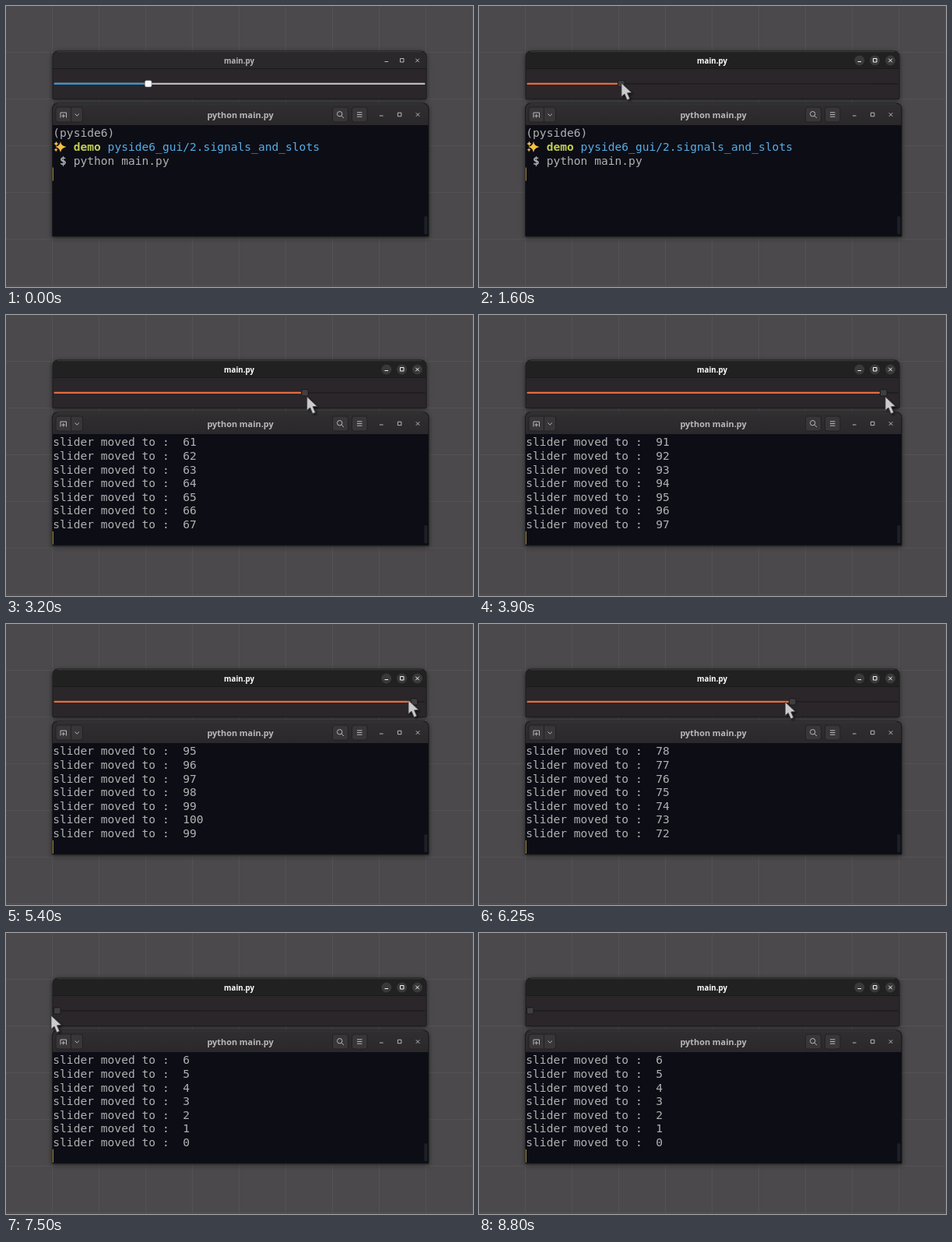
Recreate the animation shown at these times as an HTML page. Size 600 by 361 pixels, loop 9.15 s.

```html
<!DOCTYPE html>
<html lang="en">
<head>
<meta charset="utf-8">
<title>Slider demo</title>
<style>
html, body { margin: 0; width: 100%; height: 100%; overflow: hidden; background: #4b494b; }
svg { display: block; width: 600px; height: 361px; }
.title { font-family: "Open Sans", "Noto Sans", sans-serif; font-weight: 700; text-anchor: middle; }
.term { font: 14.6px "DejaVu Sans Mono", monospace; fill: #b0b1b1; white-space: pre; }
.icon { fill: none; stroke: #b9b8b9; stroke-width: 1; }
</style>
</head>
<body>
<svg viewBox="0 0 600 361">
  <defs>
    <pattern id="grid" width="60" height="60" patternUnits="userSpaceOnUse">
      <path d="M0 59.5H60M59.5 0V60" stroke="#545254" fill="none"/>
    </pattern>
    <filter id="shadow" x="-10%" y="-30%" width="120%" height="170%">
      <feDropShadow dx="0" dy="1.5" stdDeviation="3" flood-opacity=".5"/>
    </filter>
    <filter id="soft" x="-50%" y="-50%" width="220%" height="220%">
      <feDropShadow dx="2" dy="2" stdDeviation="1.5" flood-opacity=".55"/>
    </filter>
    <linearGradient id="head" x2="0" y2="1">
      <stop stop-color="#302e30"/><stop offset="1" stop-color="#2a282a"/>
    </linearGradient>
  </defs>
  <rect width="600" height="361" fill="#4b494b"/>
  <rect width="600" height="361" fill="url(#grid)"/>

  <!-- slider window -->
  <path d="M60 119.5V65q0-7 7-7H533q7 0 7 7V119.5Z" fill="#2a282a" stroke="#1b1a1b" filter="url(#shadow)"/>
  <path id="bar" d="M60.5 80V65q0-6.5 6.5-6.5H533q6.500 0 6.500 6.500V80Z"/>
  <path d="M66 58.700H534" stroke="#3c3a3c"/>
  <path d="M60 80.500H540" stroke="#1b1a1b"/>
  <text id="name" class="title" x="299.500" y="73.700" font-size="9.700">main.py</text>
  <g id="discs" fill="#3a393a">
    <circle cx="488.800" cy="70" r="6.500"/><circle cx="508.600" cy="70" r="6.500"/><circle cx="528.500" cy="70" r="6.500"/>
  </g>
  <path id="controls" class="icon" d="M486.500 71.500h4.600M506.500 67.500h4.500v4.500h-4.500zM526.300 67.700l4.500 4.500m0-4.500l-4.500 4.500"/>
  <rect id="groove" x="62" width="476.500" rx="1"/>
  <rect id="fill" x="61.500" y="98.800" height="2.300" rx="1"/>
  <rect id="knob" y="95.700" width="8.600" height="8.300" rx="1.700"/>

  <!-- terminal window -->
  <path d="M59.500 296V132q0-7 7-7H536q7 0 7 7V296Z" fill="#080b12" stroke="#1b1a1b" filter="url(#shadow)"/>
  <path d="M60 153V132q0-6.500 6.500-6.500H536q6.500 0 6.500 6.500V153Z" fill="url(#head)"/>
  <path d="M66 125.700H536" stroke="#3c3a3c"/>
  <g fill="#383638" stroke="#222122">
    <rect x="64" y="130" width="34.500" height="19" rx="3"/>
    <rect x="419.500" y="130" width="20" height="19" rx="3"/>
    <rect x="444.500" y="130" width="19.500" height="19" rx="3"/>
    <path d="M83.500 130v19"/>
  </g>
  <path class="icon" d="M70 143.500v-6.500h7.500v6.500M73.700 139v4.500M71.500 141.200h4.500M88.500 138.500l2.700 2.700l2.700-2.700M431.300 141.300l2.700 2.700M451 136.800h6.500M451 139.500h6.500M451 142.200h6.500M480 141h4.600M503.400 137.200h4.500v4.500h-4.500zM526.800 137.300l4.500 4.500m0-4.500l-4.500 4.500"/>
  <circle class="icon" cx="428.700" cy="138.700" r="3.200"/>
  <text class="title" x="301" y="143.500" font-size="10.900" fill="#b9b8b9">python main.py</text>
  <g id="prompt">
    <path fill="#f5c044" d="M70 174q.8 5.700 7.500 7q-6.700 1.300-7.500 7q-.8-5.700-6.500-7q5.700-1.300 6.500-7ZM64.500 173.800q.4 2.800 3.200 3.200q-2.800.4-3.200 3.200q-.4-2.800-3.200-3.200q2.800-.4 3.200-3.200ZM64.200 182.200q.3 2.200 2.600 2.600q-2.300.4-2.600 2.600q-.3-2.200-2.600-2.600q2.300-.4 2.600-2.600Z"/>
  </g>
  <g id="rows"></g>
  <rect id="caret" x="59.800" width="1.200" height="17" fill="#92803a"/>
  <rect x="537.300" y="270" width="4" height="23.500" rx="2" fill="#1d2127"/>

  <path id="mouse" d="M0 0V17.500L4 14L7.300 21.700L10.800 20.200L7.500 12.800L13 12.300Z" fill="#cbcbcb" stroke="#3a393a" stroke-width=".8" filter="url(#soft)"/>
</svg>
<script>
const LOOP = 9150, STEP = 50, ACTIVE_AT = 1150, ROW = 17.6, ROWS = 8;
const $ = id => document.getElementById(id);
const set = (id, attrs) => { for (const k in attrs) $(id).setAttribute(k, attrs[k]); };

// time, slider ticks travelled, pointer x, pointer y
const track = [
  [50, 0, 32, 190], [500, 0, 110, 70], [950, 0, 165, 88], [1200, 0, 183, 99],
  [1600, 0, 183, 99], [1900, 4.8, 202, 101], [2450, 12.3, 239, 104],
  [2850, 28, 313, 105], [3800, 70.6, 513, 105], [3900, 72.8, 522, 105],
  [4200, 75.9, 532, 104], [5200, 75.9, 530, 100], [5400, 77.3, 517, 98],
  [5700, 87.8, 468, 99], [6650, 115.5, 339, 101], [6850, 130.3, 271, 102],
  [7500, 175.9, 58, 106], [7600, 175.9, 55, 107], [7900, 175.9, 33, 112],
  [8050, 175.9, 33, 112], [8400, 175.9, -20, 110]
];

function sample(t) {
  const i = track.findIndex(k => k[0] > t);
  if (i === 0) return track[0];
  if (i < 0) return track[track.length - 1];
  const a = track[i - 1], b = track[i], f = (t - a[0]) / (b[0] - a[0]);
  return a.map((v, j) => v + (b[j] - v) * f);
}

// 25 up to 100, then down to 0
const valueAt = n => n <= 75 ? 25 + n : 175 - n;

const esc = "<tspan fill='#c3cf4f' font-weight='700'>demo</tspan> <tspan fill='#57aee6'>pyside6_gui/2.signals_and_slots</tspan>";
const intro = ["(pyside6)", "   " + esc, " <tspan font-weight='700'>$</tspan> python main.py"];

const rows = Array.from({ length: ROWS - 1 }, (_, i) => {
  const row = document.createElementNS("http://www.w3.org/2000/svg", "text");
  row.setAttribute("class", "term");
  row.setAttribute("x", 60.3);
  row.setAttribute("y", 168.3 + ROW * i);
  row.setAttribute("xml:space", "preserve");
  return $("rows").appendChild(row);
});

function drawTerminal(printed) {
  const total = intro.length + printed;
  const first = Math.max(0, total + 1 - ROWS);
  rows.forEach((row, i) => {
    const n = first + i;
    const line = n >= total ? "" : n < intro.length ? intro[n]
      : "slider moved to :  " + valueAt(n - intro.length + 1);
    if (row.line !== line) row.innerHTML = row.line = line;
  });
  set("prompt", { visibility: first < 2 ? "visible" : "hidden", transform: `translate(0 ${-first * ROW})` });
  set("caret", { y: 207.5 + ROW * (total - first - 3) });
}

function drawSlider(value, active) {
  const x = 65.8 + value * 4.68;
  set("bar", { fill: active ? "#222122" : "#2a282a" });
  set("name", { fill: active ? "#ffffff" : "#b9b8b9" });
  set("discs", { visibility: active ? "visible" : "hidden" });
  set("controls", { style: active ? "stroke:#f4f4f4" : "" });
  set("groove", active ? { y: 99.3, height: 1.3, fill: "#1b1a1b" } : { y: 98.8, height: 2.3, fill: "#bdbbb9" });
  set("fill", { width: Math.max(0, x - 66), fill: active ? "#e66b3c" : "#3a93d0" });
  set("knob", { x: x - 4.3, fill: active ? "#403f40" : "#f8f8f8", stroke: active ? "#191819" : "#777677", "stroke-width": active ? 1 : .5 });
}

function draw(now) {
  const t = Math.floor(now % LOOP / STEP) * STEP;
  const [, ticks, x, y] = sample(t);
  drawSlider(valueAt(Math.floor(ticks)), t >= ACTIVE_AT);
  drawTerminal(Math.max(0, Math.floor(ticks - .7)));
  set("mouse", { transform: `translate(${x} ${y})`, visibility: t >= 50 && t < 8400 ? "visible" : "hidden" });
}

const start = performance.now();
function tick() {
  draw(performance.now() - start);
  requestAnimationFrame(tick);
}
tick();
</script>
</body>
</html>
```
